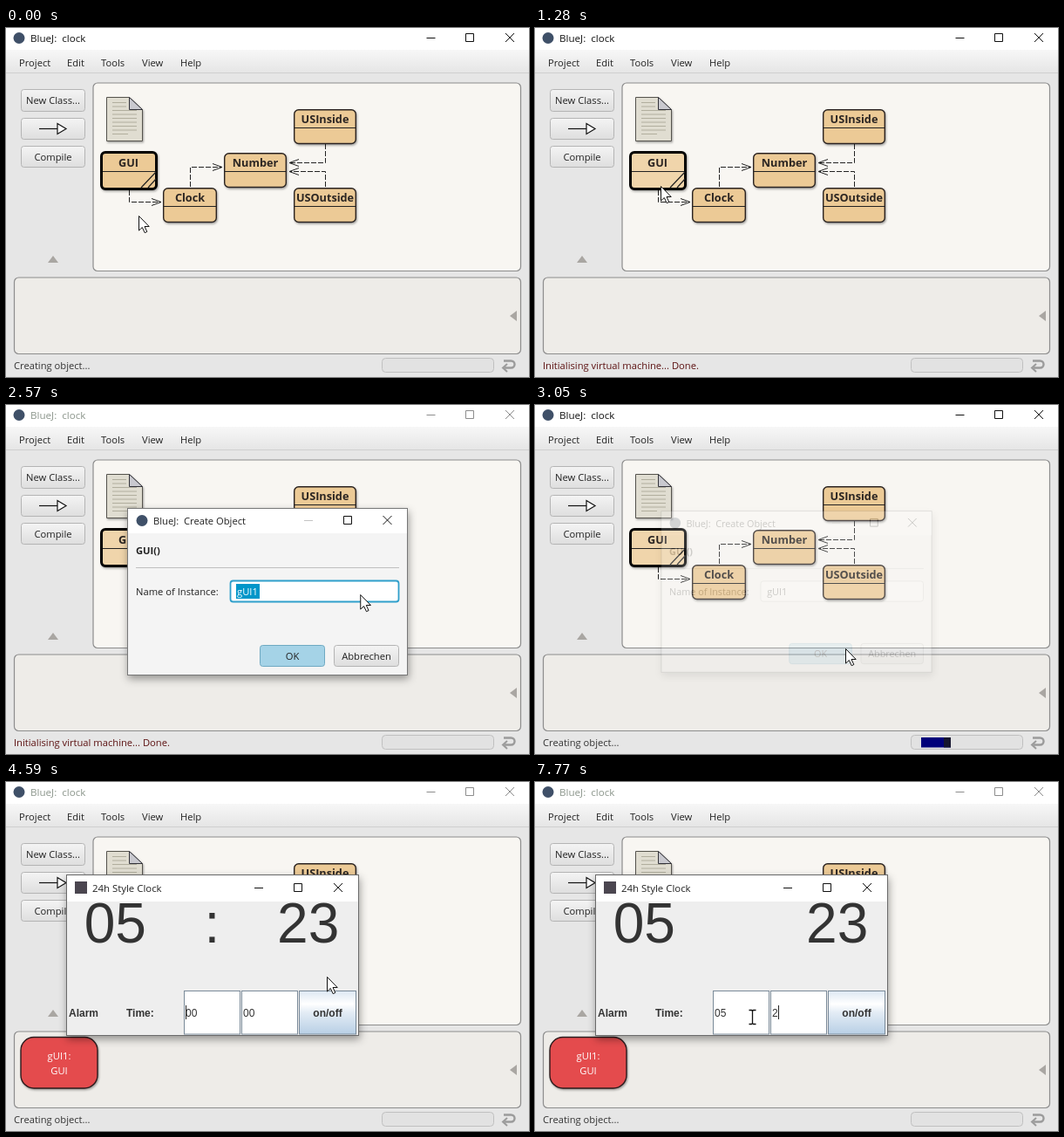
An HTML page that plays this animation: 600 by 400 pixels, repeating every 8 s.

```html
<!DOCTYPE html>
<html lang="en">
<head>
<meta charset="utf-8">
<title>BlueJ clock</title>
<style>
  html, body { margin: 0; width: 100%; height: 100%; overflow: hidden; background: #e6e6e6; }
  svg { display: block; width: 100%; height: 100%; }
  text { font: 11.2px "Open Sans", "Noto Sans", sans-serif; fill: #222; white-space: pre; }
  .mid { text-anchor: middle; }
  .name { font-size: 12.7px; font-weight: 700; text-anchor: middle; fill: #2b2522; }
  .swing { font: 12px "Liberation Sans", Arial, sans-serif; fill: #333; }
  .bold { font-weight: 700; }
  .digits { font: 64px "Liberation Sans", Arial, sans-serif; text-anchor: middle; fill: #333; }
  .menu text { fill: #7b100a; }
</style>
</head>
<body>
<svg id="stage" viewBox="0 0 600 400"></svg>
<script>
const LOOP = 8000, STEP = 68;

const rect = (x, y, w, h, fill, extra = '') =>
  `<rect x="${x}" y="${y}" width="${w}" height="${h}" fill="${fill}" ${extra}/>`;
const text = (x, y, str, cls = '', extra = '') =>
  `<text x="${x}" y="${y}" class="${cls}" ${extra}>${str}</text>`;
const path = (d, stroke = '#222', extra = '') =>
  `<path d="${d}" fill="none" stroke="${stroke}" ${extra}/>`;
const group = (id, body, extra = '') => `<g id="${id}" ${extra}>${body}</g>`;

const minimise = (x, y) => `M${x - 5} ${y + .5}h10`;
const maximise = (x, y) => `M${x - 4.5} ${y - 4.5}h9v9h-9z`;
const cross = (x, y) => `M${x - 5} ${y - 5}l10 10m0 -10l-10 10`;

const button = (x, y, w, h, label, fill = 'url(#btn)', stroke = '#b4b4b4') =>
  rect(x + .5, y + .5, w - 1, h - 1, fill, `rx="3" stroke="${stroke}"`) +
  text(x + w / 2, y + h / 2 + 4, label, 'mid');

const classBox = (x, y, w, name) =>
  rect(x + .7, y + .7, w - 1.4, 38.8, '#ecca96',
    `id="box${name}" rx="5" stroke="#2a2420" stroke-width="1.4" filter="url(#soft)"`) +
  path(`M${x + 1} ${y + 21.5}h${w - 2}`) +
  text(x + w / 2, y + 16, name, 'name');

const uses = (d, x, y, dir) =>
  path(d, '#222', 'stroke-dasharray="6 2"') +
  path(`M${x - 11 * dir} ${y - 4}L${x} ${y}l${-11 * dir} 4`);

function paperIcon() {
  let lines = '';
  for (let i = 0; i < 9; i++) {
    lines += `M122 ${85.5 + i * 4.5}h${i < 2 ? 16 : i === 8 ? 18 : 28}`;
  }
  return `<path d="M115.5 79.5h26l15 14v36h-41z" fill="#e0ddd1" stroke="#55534e" filter="url(#soft)"/>` +
    path(lines, '#b1ae9e') +
    `<path d="M141.5 79.5v14h15z" fill="#c9c9cf" stroke="#33333a"/>`;
}

const mainWindow =
  rect(0, 0, 600, 400, '#e6e6e6') +
  rect(0, 0, 600, 25, '#fff') +
  rect(0, 25, 600, 27, 'url(#bar)') + path('M0 51.5h600', '#cfcfcf') +
  group('title',
    '<circle cx="15" cy="11.5" r="6.5" fill="#3f5068"/>' +
    text(28, 16, 'BlueJ:  clock', '', 'id="caption" style="font-size:11.6px"') +
    path(minimise(487.5, 11) + maximise(532, 11) + cross(578, 11), '#111', 'id="controls"')) +
  text(15, 44, 'Project') + text(70, 44, 'Edit') + text(109, 44, 'Tools') +
  text(156, 44, 'View') + text(200, 44, 'Help') +
  button(17, 70, 74, 26, 'New Class...') + button(17, 103, 74, 25, '') + button(17, 135, 74, 25, 'Compile') +
  path('M38 115.5h21', '#111', 'stroke-width="1.2"') +
  '<path d="M59 109.5l10 6l-10 6z" fill="#fff" stroke="#111" stroke-width="1.2"/>' +
  '<path d="M48 269l6 -8l6 8z" fill="#a9a6a2"/>' +
  rect(100, 63, 490.5, 215.5, '#f8f6f2', 'rx="5" stroke="#8d8d8d" stroke-width="1.2"') +
  rect(9.5, 286, 581, 87.5, '#eeece8', 'rx="5" stroke="#8d8d8d" stroke-width="1.2"') +
  '<path d="M578 330l8 -6v12z" fill="#a9a6a2"/>' +
  paperIcon() +
  uses('M141.5 186v13.5H178', 178, 199.5, 1) +
  uses('M211.5 182v-22.5H248', 248, 159.5, 1) +
  uses('M366.5 133v21.5H326', 325, 154.5, -1) +
  uses('M366.5 182v-17.5H326', 325, 164.5, -1) +
  rect(109.5, 142.5, 63, 42, '#ecca96', 'id="boxGUI" rx="4.5" stroke="#000" stroke-width="3" filter="url(#soft)"') +
  path('M111 164.5h60') + path('M155 183l17 -18M163 183l9 -10', '#222', 'stroke-width="1.2"') +
  text(140.5, 159, 'GUI', 'name') +
  classBox(180, 183, 62, 'Clock') + classBox(250, 143, 72, 'Number') +
  classBox(330, 93, 72, 'USInside') + classBox(330, 183, 72, 'USOutside') +
  text(9, 391, '', '', 'id="status"') +
  rect(431.5, 378.5, 128, 16, '#e2e2e2', 'rx="4" stroke="#c0c0c0"') +
  group('busy', rect(0, 381, 34, 11.5, '#00007a') + rect(26, 381, 8, 11.5, '#15152e')) +
  path('M571 381.5h8.5a4 4 0 0 1 0 8h-8', '#9b9b9b', 'stroke-width="2.4"') +
  path('M575 385l-5 4.5l5 4.5', '#9b9b9b', 'stroke-width="2"');

const objectCard =
  rect(-44, -29.5, 88, 58.5, '#e44c4e', 'rx="15" stroke="#2c1a1c" stroke-width="1.4" filter="url(#soft)"') +
  text(0, -4, 'gUI1:', 'mid', 'style="fill:#fff"') + text(0, 13, 'GUI', 'mid', 'style="fill:#fff"');

const items = ['Open Editor', 'Compile', 'Inspect', 'Delete', 'Duplicate...', 'Convert to Stride'];
const popup =
  rect(131.5, 172.5, 161, 213, '#fff', 'stroke="#c0c0c0" filter="url(#drop)"') +
  rect(132, 176, 160.5, 25.5, '#0096c9', 'id="mark"') +
  text(137, 193, 'new GUI()', '', 'id="first"') +
  path('M132 204.5h160M132 355.5h160', '#c8c8c8') +
  items.map((s, i) => text(137, 221 + i * 25, s)).join('') +
  text(137, 374, 'Create Test Class');

const dialog =
  rect(139.5, 118.5, 321, 191, '#f4f4f4', 'stroke="#777" filter="url(#drop)"') +
  rect(140, 119, 320, 28, '#fff') +
  '<circle cx="156" cy="132.5" r="6.5" fill="#3f5068"/>' +
  text(169, 137, 'BlueJ:  Create Object') +
  path(minimise(347, 132), '#c4c4c4') + path(maximise(392, 132) + cross(437.5, 132), '#111') +
  text(149, 171, 'GUI()', 'bold') + path('M149 186.5h302', '#c0c0c0') +
  text(149, 218, 'Name of Instance:') +
  rect(257.5, 201.5, 193, 24, '#fff', 'id="field" rx="3"') +
  rect(264, 205, 27, 17, '#0096c9', 'id="selection"') +
  text(265, 218, 'gUI1', '', 'id="instance"') +
  button(291, 275, 75, 25, 'OK', '#a5d3e7', '#6fa9c2') + button(376, 275, 75, 25, 'Abbrechen');

const clockWindow =
  rect(69.5, 106.5, 335, 184, '#eee', 'stroke="#6a6a6a" filter="url(#drop)"') +
  rect(70, 107, 334, 30, '#fff') +
  rect(79, 114, 14, 14, '#4b4650') +
  text(99, 126, '24h Style Clock', '', 'style="font-size:11.4px"') +
  path(minimise(290, 121) + maximise(335, 121) + cross(381, 121), '#111') +
  text(125.3, 183.5, '05', 'digits') + text(236.5, 183.5, ':', 'digits', 'id="colon"') +
  text(346.7, 183.5, '23', 'digits') +
  text(72, 269, 'Alarm', 'swing bold') + text(138, 269, 'Time:', 'swing bold') +
  rect(204.5, 239.5, 64, 49.5, '#fff', 'stroke="#7a8a99"') +
  rect(270.5, 239.5, 64, 49.5, '#fff', 'stroke="#7a8a99"') +
  rect(336.5, 239.5, 65, 49.5, 'url(#metal)', 'stroke="#7a8a99"') +
  text(369, 269, 'on/off', 'swing bold mid') +
  text(206, 269, '', 'swing', 'id="hours"') + text(272, 269, '', 'swing', 'id="minutes"') +
  rect(0, 256, 1, 16, '#222', 'id="caret"');

const pointers =
  group('arrow', '<path d="M.5 .5v16.6l3.8 -3.6l2.9 6.2l2.6 -1.2l-2.8 -6h5.2z" fill="#fff" stroke="#111"/>') +
  group('hand', '<path d="M2.5 14.5V2a1.7 1.7 0 0 1 3.4 0v6.2c1.2 -1 2.8 -.6 3 .5c1.2 -.8 2.7 -.3 2.9 .7c1.4 -.5 2.7 .2 2.7 1.6v5.5c0 1.800 -1.500 3 -1.500 5.200v1.300H4.500v-1.500C3.500 19.500 .5 17 -1.500 13.800c-1.300 -2 .8 -3.300 2.200 -1.800z" fill="#fff" stroke="#111"/>' +
    path('M5.9 8v5M8.900 9v4M11.800 9.700v3.500', '#111')) +
  group('beam', path('M-4 -7.5h3l1 1l1 -1h3M0 -7V8M-4 8.500h3l1 -1l1 1h3', '#111', 'stroke-width="1.3"'));

const gradient = (id, ...stops) => `<linearGradient id="${id}" x2="0" y2="1">` +
  stops.map(([o, c]) => `<stop offset="${o}" stop-color="${c}"/>`).join('') + '</linearGradient>';
const shadow = (id, dx, dy, blur, alpha) =>
  `<filter id="${id}" x="-20%" y="-20%" width="140%" height="150%">` +
  `<feDropShadow dx="${dx}" dy="${dy}" stdDeviation="${blur}" flood-opacity="${alpha}"/></filter>`;

document.getElementById('stage').innerHTML = '<defs>' +
  gradient('bar', [0, '#f7f7f7'], [1, '#e5e5e5']) +
  gradient('btn', [0, '#f4f4f4'], [1, '#dedede']) +
  gradient('metal', [0, '#dde8f3'], [.3, '#fff'], [.5, '#e3ecf5'], [1, '#b8cfe5']) +
  shadow('soft', 1, 1.5, 1.2, .35) + shadow('drop', 1, 4, 5, .38) +
  '<clipPath id="slot"><rect x="432" y="379" width="127" height="15"/></clipPath></defs>' +
  mainWindow + group('card', objectCard) + group('popup', popup, 'class="menu"') +
  group('dialog', dialog) + group('clock', clockWindow) + pointers +
  '<circle id="ring" r="12" fill-opacity=".47"/>';

const el = {};
document.querySelectorAll('[id]').forEach(n => el[n.id] = n);
const show = (n, on) => n.setAttribute('visibility', on ? 'visible' : 'hidden');
const put = (n, x, y, k = 1) => n.setAttribute('transform', `translate(${x} ${y}) scale(${k})`);
const clamp = v => Math.max(0, Math.min(1, v));
const latest = (rows, t) => rows.reduce((hit, r) => r[0] <= t ? r : hit, rows[0]);

// Busy stretches: start, number of steps
const bursts = [[0, 1], [60, 6], [600, 5], [1220, 6], [1750, 12], [2570, 12], [3390, 12], [4590, 3]];
function snap(t) {
  const [start, n] = latest(bursts, t);
  return start + STEP * Math.min(n - 1, Math.floor((t - start) / STEP + .1));
}

const track = [[0, 152, 215], [20, 152, 215], [390, 131, 172], [600, 131, 172], [870, 144, 181],
  [1700, 144, 181], [2498, 416, 205], [2780, 356, 279], [3060, 356, 279], [3330, 398, 236],
  [3530, 406, 212], [3934, 402, 209], [4130, 368, 223], [4590, 368, 223], [4726, 249, 269], [8000, 249, 269]];
function pointerAt(s) {
  const i = track.findIndex(p => p[0] > s), a = track[i - 1], b = track[i];
  const u = (s - a[0]) / (b[0] - a[0]), e = u * u * (3 - 2 * u);
  return [a[1] + (b[1] - a[1]) * e, a[2] + (b[2] - a[2]) * e];
}

// Clicks: from, to, x, y, colour
const clicks = [[400, 600, 131, 172, '#f00'], [1080, 1220, 143, 181, '#ff0'],
  [2840, 2970, 356, 279, '#ff0'], [5040, 5170, 247, 268, '#ff0']];
// Typing: time, hours, minutes, caret x (0 = hidden)
const typing = [[4590, '00', '00', 206], [5040, '00', '00', 220], [5500, '00', '00', 0],
  [5830, '0', '00', 213], [6030, '05', '00', 220], [6290, '05', '00', 272], [6750, '05', '00', 279],
  [7020, '05', '00', 286], [7170, '05', '0', 279], [7370, '05', '', 272], [7770, '05', '2', 279]];

function render(t) {
  const s = snap(t), [x, y] = pointerAt(s);
  const clockOpen = t >= 4590, closing = s >= 2970;
  const active = !clockOpen && (s < 1350 || closing);

  el.caption.style.fill = active ? '#111' : '#8b958b';
  el.controls.setAttribute('stroke', active ? '#111' : '#8d8d8d');
  const starting = s >= 190 && s < 2900;
  el.status.textContent = starting ? 'Initialising virtual machine... Done.' : 'Creating object...';
  el.status.style.fill = starting && s >= 600 ? '#5c1212' : '#333';

  const onHand = s >= 3520 && s < 4060;
  el.boxGUI.setAttribute('fill', s > 250 && s < 3100 ? '#f0d5ab' : '#ecca96');
  el.boxUSOutside.setAttribute('fill', onHand ? '#f0d5ab' : '#ecca96');

  show(el.busy, s >= 2900 && s < 3860);
  put(el.busy, 443 + .085 * (s - 3046), 0);

  const grow = t >= 4260 ? 1 : .2 + (s - 3934) * .0034;
  show(el.card, grow > 0);
  put(el.card, 61, 322, Math.max(grow, 0));

  const marked = s >= 730;
  show(el.popup, s >= 600 && s < 1220);
  el.mark.setAttribute('fill', marked ? '#0096c9' : '#fff');
  el.first.style.fill = marked ? '#fff' : '#7b100a';

  const alpha = closing ? clamp(1 - (s - 2910) / 170) : clamp((s - 1288) / 219);
  const k = closing ? 1 - .042 * (1 - alpha) : 1 - .1 * (1 - alpha) ** 2;
  show(el.dialog, alpha > 0);
  el.dialog.setAttribute('opacity', alpha);
  put(el.dialog, 300 * (1 - k), 214 * (1 - k), k);
  el.field.setAttribute('stroke', closing ? '#c4c4c4' : '#2f9fcb');
  el.field.setAttribute('stroke-width', closing ? 1 : 1.8);
  el.selection.setAttribute('fill', closing ? '#fff' : '#0096c9');
  el.instance.style.fill = closing ? '#222' : '#fff';

  const [, hours, minutes, caret] = latest(typing, t);
  el.clock.style.display = clockOpen ? '' : 'none';
  el.colon.style.display = t < 5170 || t >= 6160 && t < 7170 ? '' : 'none';
  el.hours.textContent = hours;
  el.minutes.textContent = minutes;
  el.caret.setAttribute('x', caret);
  el.caret.style.display = caret ? '' : 'none';

  const onBeam = s >= 4720;
  show(el.arrow, !onHand && !onBeam);
  show(el.hand, onHand);
  show(el.beam, onBeam);
  put(el.arrow, x, y);
  put(el.hand, x, y + .5);
  put(el.beam, x + .5, y);

  const click = clicks.find(c => t >= c[0] && t < c[1]);
  show(el.ring, click);
  if (click) {
    put(el.ring, click[2], click[3]);
    el.ring.setAttribute('fill', click[4]);
  }
}

el.busy.outerHTML = `<g clip-path="url(#slot)">${el.busy.outerHTML}</g>`;
el.busy = document.getElementById('busy');

const origin = performance.now();
function tick() {
  render((performance.now() - origin) % LOOP);
  requestAnimationFrame(tick);
}
tick();
</script>
</body>
</html>
```
